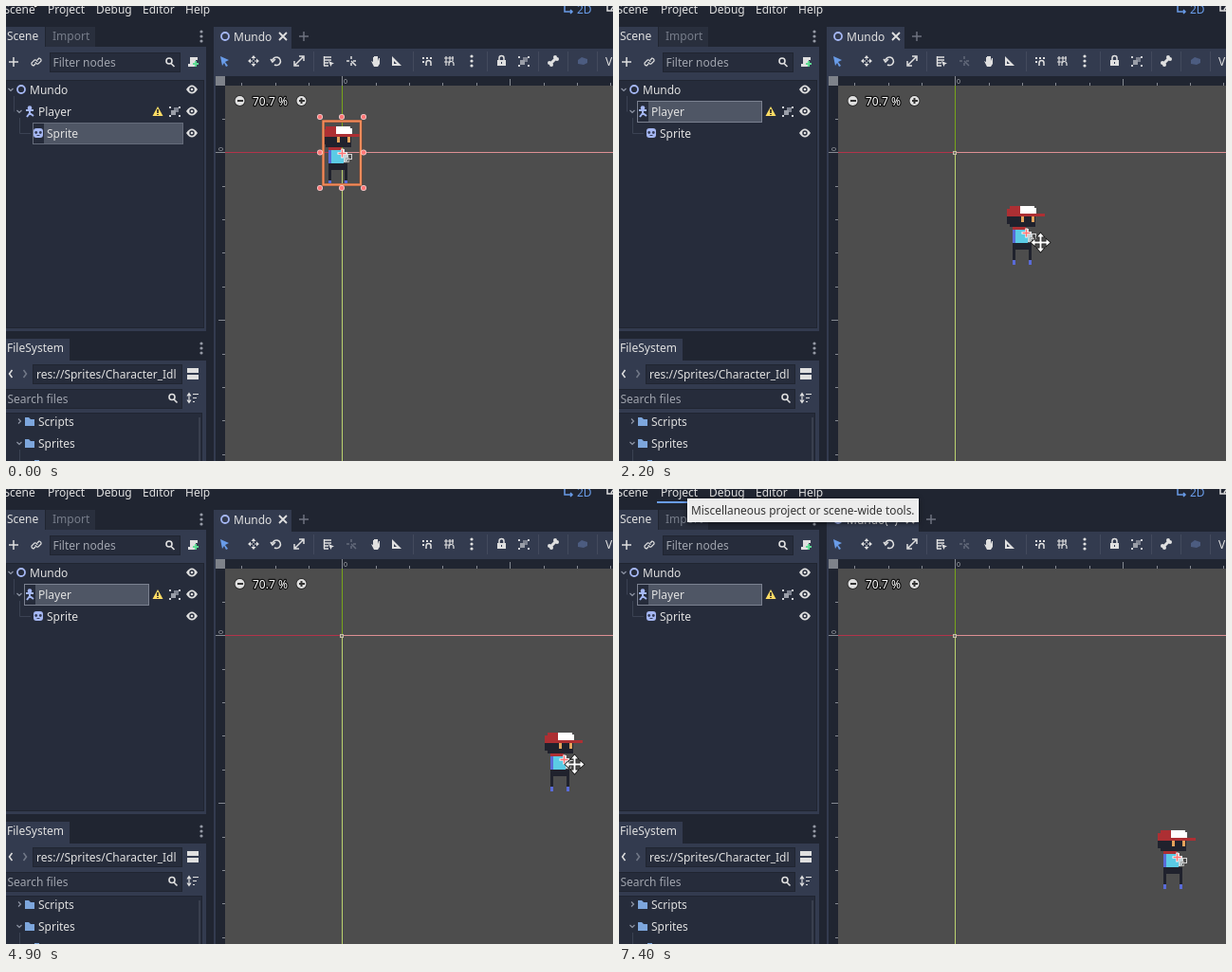
Animation of 640 by 480 pixels, one loop 8000 ms. Source, as an HTML page with a canvas:

```html
<!DOCTYPE html>
<html lang="en">
<head>
<meta charset="utf-8">
<title>Scene editor</title>
<style>
html, body { margin: 0; width: 640px; height: 480px; overflow: hidden; background: #202531; }
canvas { display: block; }
</style>
</head>
<body>
<canvas id="stage" width="640" height="480"></canvas>
<script>
const ctx = document.getElementById('stage').getContext('2d');
const LOOP = 8000, SELECT = 1400, RELEASE = 6000, HOVER = 6900, TOOLTIP = 7400;
const BASE = '#333b4f', DARK = '#262c3b', DARKER = '#202531', LIGHT = '#e0e0e0', BLUE = '#699ce8', NODE = '#a5b7f3';

// Keys are [time, x, y]
const spriteKeys = [[1400, 334, 127], [1500, 335, 127], [1700, 350, 143], [2200, 409, 211], [2400, 428, 243],
  [2500, 428, 243], [2900, 491, 278], [3300, 568, 255], [4800, 568, 255], [4900, 568, 257], [5100, 568, 283],
  [5200, 568, 283], [5500, 568, 330], [5900, 568, 360]];
const mouseKeys = [[0, 24, -16], [100, 34, -6], [400, 225, 120], [700, 345, 209], [900, 354, 167], [1200, 354, 157],
  [1399, 354, 157], [1400, 366, 157], [1500, 367, 157], [2200, 444, 249], [2400, 470, 275], [2500, 470, 275],
  [2900, 540, 309], [3300, 599, 287], [4800, 599, 287], [4900, 599, 290], [5100, 600, 317], [5200, 600, 317],
  [5500, 600, 365], [5900, 600, 391], [6100, 628, 383], [6300, 189, 113], [6400, 189, 113], [7000, 85, -16],
  [7100, 85, -16], [7200, 85, -30]];

function at(keys, t) {
  const i = keys.findIndex(k => k[0] > t);
  if (i === 0) return keys[0].slice(1);
  if (i < 0) return keys[keys.length - 1].slice(1);
  const [a, ax, ay] = keys[i - 1], [b, bx, by] = keys[i], p = (t - a) / (b - a);
  return [Math.round(ax + (bx - ax) * p), Math.round(ay + (by - ay) * p)];
}
function rect(color, x, y, w, h) { ctx.fillStyle = color; ctx.fillRect(x, y, w, h); }
function frame(color, x, y, w, h, width = 1) {
  ctx.strokeStyle = color; ctx.lineWidth = width;
  ctx.strokeRect(x, y, w, h);
}
function field(x, y, w, h) {
  rect(DARK, x, y, w, h);
  frame(DARKER, x + 0.5, y + 0.5, w - 1, h - 1);
}
function text(s, x, y, color = LIGHT, size = 12) {
  ctx.font = `${size}px "Noto Sans", sans-serif`;
  ctx.fillStyle = color;
  ctx.fillText(s, x, y);
}
function disc(color, x, y, r) {
  ctx.fillStyle = color;
  ctx.beginPath(); ctx.arc(x, y, r, 0, 7); ctx.fill();
}
function path(d, x, y, { fill, stroke, width = 1.5 } = {}) {
  const p = new Path2D(d);
  ctx.save();
  ctx.translate(x, y);
  if (stroke) { ctx.strokeStyle = stroke; ctx.lineWidth = width; ctx.stroke(p); }
  if (fill) { ctx.fillStyle = fill; ctx.fill(p); }
  ctx.restore();
}
const line = (d, x, y, stroke = LIGHT, width = 1.5) => path(d, x, y, { stroke, width });
const solid = (d, x, y, fill = LIGHT) => path(d, x, y, { fill });

function ring(x, y, r = 4) { line(`M${r} 0A${r} ${r} 0 1 1 ${-r} 0A${r} ${r} 0 1 1 ${r} 0`, x, y, NODE, 1.8); }
function dots(x, y, color = '#969ba6') { for (const d of [-5, 0, 5]) disc(color, x, y + d, 1.6); }
function magnifier(x, y) { line('M2 -1A3 3 0 1 1 -4 -1A3 3 0 1 1 2 -1M1 1.5L4.5 5', x, y, LIGHT, 1.6); }
function group(x, y) {
  rect('#7d828f', x - 1, y - 4, 5, 5); rect('#9a9ea8', x - 4, y - 1, 5, 5);
  for (const dx of [-6, 4]) for (const dy of [-5, 4]) rect('#d0d2d7', x + dx, y + dy, 2, 2);
}
function eye(y) {
  solid('M-6 0Q0 -9 6 0Q0 9 -6 0Z', 196, y);
  disc(DARK, 196, y, 2.7);
  disc(LIGHT, 196, y, 1.3);
}
function folder(x, y) { solid('M-5 -4H-1L1 -2H5V5H-5Z', x, y, '#7da6dc'); }
function chevron(x, y, open) { line(open ? 'M-2.5 -1L0 1.5L2.5 -1' : 'M-1 -2.5L1.5 0L-1 2.5', x, y, '#8f96a6', 1.2); }

function drawTree(playerSelected) {
  field(0, 78, 209, 262);
  if (playerSelected) {
    rect('#4f5665', 31, 101, 119, 22);
    frame('#7b8190', 19.5, 100.5, 131, 22);
  } else {
    rect('#4f5665', 40, 123, 147, 23);
    frame('#656c7b', 28.5, 123.5, 158, 22);
  }
  line('M8.5 95V111.5M14.5 118V134.5H26', 0, 0, '#3b4253', 1);
  chevron(5, 88, true); ring(16, 88); text('Mundo', 25, 93);
  chevron(14, 111, true);
  disc(NODE, 25, 107.5, 2.3);
  line('M-4 -1H4M0 -1V2L-3 6M0 2L4 5', 25, 111, NODE, 2);
  text('Player', 34, 116);
  solid('M0 -5L5.5 5H-5.5Z', 160, 111, '#ffdd65');
  rect('#4b4330', 159, 109, 2, 4); rect('#4b4330', 159, 114, 2, 1);
  group(178, 111);
  solid('M-5 -2Q-5 -5 -2 -5H2Q5 -5 5 -2V2Q5 5 2 5H-2Q-5 5 -5 2Z', 34, 134, NODE);
  disc('#343c58', 31.7, 133.5, 1.4); disc('#343c58', 36.3, 133.5, 1.4); rect('#343c58', 32.5, 136, 3, 1);
  text('Sprite', 43, 139);
  [88, 111, 134].forEach(eye);
}

function drawDocks(playerSelected) {
  rect(BASE, 0, 22, 41, 22);
  rect('#292f3d', 42, 22, 52, 21);
  text('Scene', 1, 36); text('Import', 49, 36, '#777d8a');
  dots(206, 32);
  rect(BASE, 0, 43, 211, 300);
  line('M3 0H13M8 -5V5', 0, 59);
  line('M-1 2L-3 4A2.4 2.4 0 0 1 -5 1L-2 -2A2.4 2.4 0 0 1 1 0M1 -2L3 -4A2.4 2.4 0 0 1 5 -1L2 2A2.4 2.4 0 0 1 -1 0', 32, 59, LIGHT, 1.2);
  field(46, 49, 138, 21);
  text('Filter nodes', 49.5, 63.5, '#a0a4ae');
  magnifier(173, 59);
  solid('M-3 -5H5V-2H3V4Q3 5 1 5H-5V2H-3Z', 197, 59);
  line('M-3 0H3M0 -3V3', 200, 61, '#5fdc94', 2);
  drawTree(playerSelected);

  rect(BASE, 0, 351, 67, 24);
  text('FileSystem', 1, 365);
  dots(206, 361);
  rect(BASE, 0, 374, 211, 106);
  line('M1.5 -4L-1.5 0L1.5 4', 5, 388); line('M-1.5 -4L1.5 0L-1.5 4', 20, 388, '#727988');
  field(28, 378, 158, 21);
  text('res://Sprites/Character_Idl', 32, 392.5);
  rect(LIGHT, 191, 382, 12, 5); rect(LIGHT, 191, 389, 12, 5);
  field(-1, 404, 187, 21);
  text('Search files', 1.5, 418.5, '#a0a4ae');
  magnifier(176, 413.5);
  line('M-4 -4V5M-6 -2L-4 -5L-2 -2M-6 2L-4 5L-2 2M0 -4H6M0 0H4M0 4H2', 197, 413.5, LIGHT, 1.2);
  field(-1, 429, 208, 60);
  rect('#393f4e', 203, 434, 2, 46);
  chevron(14, 438); folder(25, 438); text('Scripts', 34, 443);
  chevron(14, 461, true); folder(25, 461); text('Sprites', 34, 466);
  line('M14.5 468V480', 0, 0, '#3b4253', 1);
  rect('#7da6dc', 30, 479, 5, 1);
}

function drawMenu(hover) {
  [['Scene', -2.5], ['Project', 44], ['Debug', 95], ['Editor', 144], ['Help', 189]].forEach(([s, x]) => text(s, x, 8));
  line('M-4 -6V3H4M2 1L4 3L2 5', 593, 3, BLUE);
  text('2D', 602, 8, BLUE);
  line('M-2 -5V2H5M2 1L5 -3', 636, 3);
  if (hover) rect(BLUE, 40, 13, 48, 2);
}

function drawToolbar(playerSelected, edited) {
  const grow = edited ? 15 : 0;
  rect(BASE, 219, 22, 82 + grow, 24);
  rect(BASE, 219, 45, 421, 435);
  ring(231, 32);
  text(edited ? 'Mundo(*)' : 'Mundo', 240, 37);
  line('M-4 -4L4 4M4 -4L-4 4', 292 + grow, 32, LIGHT, 1.8);
  line('M-5 0H5M0 -5V5', 314 + grow, 32, '#6d727f');
  for (const x of [324, 429, 507, 561, 592, 623]) rect('#434a5d', x, 48, 1, 21);

  solid('M-4 -5L5 -1L1 1L4 5L2 6L0 2L-2 5Z', 230, 58, BLUE);
  line('M-4 0H-1M1 0H4M0 -4V-1M0 1V4', 261, 58, LIGHT, 1);
  solid('M0 -6L2.5 -3H-2.5ZM0 6L2.5 3H-2.5ZM-6 0L-3 -2.5V2.5ZM6 0L3 -2.5V2.5Z', 261, 58);
  line('M-4 -1A4.3 4.3 0 1 1 -2 4M-6 -2L-4 1L-1 -2', 285, 58);
  line('M-4 4L4 -4M0 -5H5V0M-5 0V5H0', 309, 58);
  line('M-5 -4H3M-5 -1H3M-5 2H0M-5 5H0M-4.5 -5V5', 340, 58, LIGHT, 1.4);
  solid('M0 0L6 2.5L3.5 3.5L2.5 6Z', 340, 58);
  line('M-5 0H-2M2 0H5M0 -5V-2M0 2V5M0 0L5 5', 364, 58, playerSelected ? '#646b7b' : LIGHT);
  solid('M-4 0L-2 1V-4H-1V0V-5H1V0V-5H3V0L4 -3H5V3L3 6H-1Z', 389, 58);
  solid('M-5 -5L5 5H-5Z', 412, 58); solid('M-3 0L0 3H-3Z', 412, 58, BASE);
  for (const [a, b] of [[-5, -4], [-1, -4], [3, -4], [-5, 0]]) rect(LIGHT, 444 + a, 58 + b, 2, 2);
  line('M-1 5V2A2.3 2.3 0 0 1 4 2V5', 444, 58);
  line('M-5 -3H5M-5 1H1M-3 -5V5M1 -5V1M4 -5V0M0 5V3A2 2 0 0 1 5 3V5', 467, 58, LIGHT, 1.2);
  dots(491, 58, LIGHT);
  rect(LIGHT, 518, 57, 9, 6); line('M-2.5 0V-2A2.5 2.5 0 0 1 2.5 -2V0', 522.5, 57); rect(BASE, 522, 59, 1, 2);
  group(546, 58);
  line('M-3 3L3 -3', 577, 58, LIGHT, 3);
  for (const [a, b] of [[-4, 2], [-2, 4], [2, -4], [4, -2]]) disc(LIGHT, 577 + a, 58 + b, 2);
  solid('M-5 -1L-1 -4L5 -2V2L1 4L-5 3Z', 608, 58, '#4c5c80');
  text('V', 632, 63);
}

function drawViewport() {
  rect('#4d4d4d', 231, 84, 409, 396);
  rect(DARKER, 221, 74, 419, 10);
  rect(DARKER, 221, 84, 10, 396);
  rect('#7e828a', 221, 74, 10, 10);
  for (let i = -3; i < 10; i++) {
    const x = Math.round(354.4 + i * 35.35), y = Math.round(154.4 + i * 35.35), len = i % 5 ? 3 : 7;
    if (x > 231) rect('#868a92', x, 84 - len, 1, len);
    if (y > 84) rect('#868a92', 231 - len, y, len, 1);
  }
  rect('#868a92', 354, 74, 1, 10); rect('#868a92', 221, 154, 10, 1);
  text('0', 356, 82, '#a5a8ae', 7);
  ctx.save();
  ctx.translate(229, 153); ctx.rotate(-Math.PI / 2);
  text('0', 0, 0, '#a5a8ae', 7);
  ctx.restore();

  rect('#b2344b', 231, 154, 123, 1); rect('#dd8f94', 354, 154, 286, 1);
  rect('#78a51b', 354, 84, 1, 70); rect('#bcd36f', 354, 154, 1, 326);
  rect('#c4bca8', 352, 153, 4, 4); rect('#77736a', 353, 154, 2, 2);

  for (const x of [246.5, 311.5]) {
    disc('#303030', x, 100, 6); disc(LIGHT, x, 100, 5);
    rect('#333', x - 2.5, 99, 6, 2);
  }
  rect('#333', 310.5, 97, 2, 6);
  ctx.lineJoin = 'round';
  ctx.lineWidth = 2.5; ctx.strokeStyle = '#111';
  ctx.font = '12px "Noto Sans", sans-serif';
  ctx.strokeText('70.7 %', 260, 105);
  text('70.7 %', 260, 105, '#fff');
  ctx.lineJoin = 'miter';
}

function drawCharacter(x, y) {
  const part = (color, a, b, w, h) => rect(color, x + a, y + b, w, h);
  const black = '#20222d', red = '#ad2f33', indigo = '#596bd8';
  part(red, 3, 0, 12, 3); part(red, 0, 3, 15, 8);
  part('#fff', 14, 0, 15, 3); part('#fff', 14, 2, 17, 6);
  part(red, 14, 8, 26, 3);
  part(black, 0, 11, 30, 8); part(black, 3, 19, 27, 3);
  for (const eyeX of [15, 26]) part('#e5a35b', eyeX, 11, 3, 6);
  part(red, 6, 22, 14, 3);
  part(indigo, 6, 25, 3, 14); part('#5bcbe5', 9, 25, 13, 14);
  part('#d9dce0', 20, 24, 3, 3); part('#c8d4d8', 22, 27, 4, 11);
  part(black, 6, 39, 20, 7);
  for (const legX of [6, 23]) { part(black, legX, 46, 3, 11); part(indigo, legX, 57, 3, 5); }
  line('M-5 0H5M0 -5V5', x + 20.5, y + 28.5, '#fff', 2.5);
  line('M-4 0H4M0 -4V4', x + 20.5, y + 28.5, '#ff7474', 1.5);
  frame('#d5d5d5', x + 26.5, y + 29.5, 4, 5); frame('#aaa', x + 24.5, y + 33.5, 3, 4);
}

function drawSelection() {
  frame('#874f35', 334.5, 121.5, 39.5, 67, 3);
  frame('#f58b5b', 334.5, 121.5, 39.5, 67, 2);
  for (const x of [331, 354, 377]) for (const y of [117, 154.5, 192]) {
    if (x === 354 && y === 154.5) continue;
    disc('#fbd0d0', x, y, 3); disc('#ff7676', x, y, 2.2);
  }
}

function drawCursor(x, y, moving) {
  const shape = moving
    ? 'M0 -10L3.5 -6H1V-1H6V-3.5L10 0L6 3.5V1H1V6H3.5L0 10L-3.5 6H-1V1H-6V3.5L-10 0L-6 -3.5V-1H-1V-6H-3.5Z'
    : 'M0.5 0.5V15.5L4 12.5L6.3 17.5L8.8 16.5L6.6 11.5H11Z';
  path(shape, x + (moving ? 0.5 : 0), y + (moving ? 0.5 : 0), { fill: '#fff', stroke: '#111', width: 1.5 });
}

function drawTooltip() {
  ctx.save();
  ctx.shadowColor = 'rgba(0,0,0,.6)'; ctx.shadowBlur = 5; ctx.shadowOffsetY = 1;
  rect('#ececec', 72, 10, 244, 25);
  ctx.restore();
  frame('#fafafa', 72.5, 10.5, 243, 24);
  text('Miscellaneous project or scene-wide tools.', 76, 27, '#333', 11.9);
}

function draw(t) {
  const playerSelected = t >= SELECT;
  rect(DARKER, 0, 0, 640, 480);
  drawMenu(t >= HOVER);
  drawDocks(playerSelected);
  drawToolbar(playerSelected, t >= RELEASE);
  drawViewport();
  drawCharacter(...at(spriteKeys, t));
  if (!playerSelected) drawSelection();
  if (t >= TOOLTIP) drawTooltip();
  drawCursor(...at(mouseKeys, t), playerSelected && t < RELEASE);
}

function tick() {
  draw(Math.floor(performance.now() % LOOP / 100) * 100);
  requestAnimationFrame(tick);
}
tick();
</script>
</body>
</html>
```
